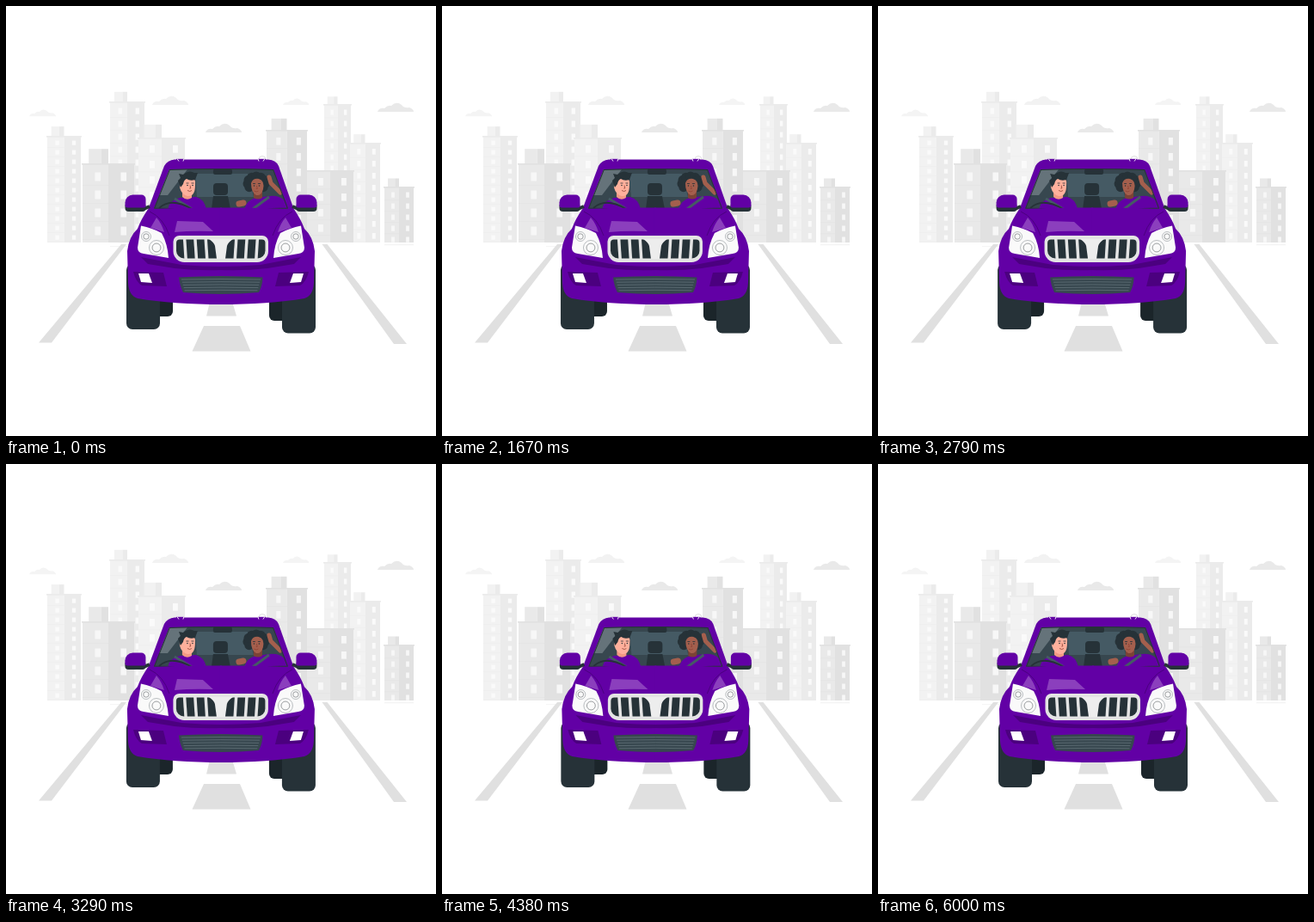
An HTML page with a canvas that plays this animation: 500 px wide and 500 px high, repeating every 6.04 s.

```html
<!DOCTYPE html>
<html lang="en">
<head>
<meta charset="utf-8">
<title>Car ride</title>
<style>
html, body { margin: 0; width: 100%; height: 100%; overflow: hidden; background: #fff; }
canvas { display: block; width: 500px; height: 500px; }
</style>
</head>
<body>
<canvas id="stage"></canvas>
<script>
const canvas = document.getElementById('stage');
const ctx = canvas.getContext('2d');
const ratio = window.devicePixelRatio || 1;
canvas.width = canvas.height = 500 * ratio;

const LOOP = 6040, STEP = 600, REACH = 0.75;
const SWINGS = [0, -1, 2, -4, 4, -4];
const BODY = '#6200a5', SHADE = '#4b007f', GLOSS = '#8b3fbd';
const INK = '#263238', SLATE = '#37474f', STEEL = '#455a64', LIGHT = '#e4e4e4';
const FAR = ['#f2f2f2', '#ebebeb', '#fafafa'];
const NEAR = ['#e9e9e9', '#e1e1e1', '#f7f7f7'];

function fill(color, d) {
  ctx.fillStyle = color;
  ctx.fill(new Path2D(d));
}
function line(color, width, d) {
  ctx.strokeStyle = color;
  ctx.lineWidth = width;
  ctx.stroke(new Path2D(d));
}
function rect(color, x, y, w, h) {
  ctx.fillStyle = color;
  ctx.fillRect(x, y, w, h);
}
function round(color, x, y, w, h, r) {
  ctx.fillStyle = color;
  ctx.beginPath();
  ctx.roundRect(x, y, w, h, r);
  ctx.fill();
}
function disc(color, x, y, r) {
  ctx.fillStyle = color;
  ctx.beginPath();
  ctx.arc(x, y, r, 0, Math.PI * 2);
  ctx.fill();
}
function ring(color, width, x, y, r) {
  ctx.strokeStyle = color;
  ctx.lineWidth = width;
  ctx.beginPath();
  ctx.arc(x, y, r, 0, Math.PI * 2);
  ctx.stroke();
}
// Draws a part and its mirror image about the middle of the stage.
function both(part) {
  part(0);
  ctx.save();
  ctx.translate(500, 0);
  ctx.scale(-1, 1);
  part(1);
  ctx.restore();
}

// Everything on a tower follows from its width, storey height and tone.
function tower(x, y, w, storey, tone, roof = w * 0.28) {
  const [front, side, pane] = tone;
  const half = w / 2, tall = 275 - y;
  rect(front, x + w * 0.12, y - roof, w * 0.24, roof);
  rect(side, x + w * 0.36, y - roof, w * 0.14, roof);
  rect(front, x, y, half, tall);
  rect(side, x + half, y, half, tall);
  for (let wy = y + storey * 0.5; wy < 270; wy += storey) {
    for (const part of [0.24, 0.74]) {
      rect(pane, x + w * part, wy, w * 0.11, storey * 0.48);
    }
    rect(side, x, wy + storey * 0.7, w, 0.5);
  }
  rect(side, x - 1, y, w + 2, 1.6);
}

function cloud(x, y, size, color) {
  ctx.save();
  ctx.translate(x, y);
  ctx.scale(size, size);
  fill(color, 'M0 11Q2 6 8 7Q12 3 16 4Q22-2 28 3Q31 7 37 6Q42 8 42 11Z');
  ctx.restore();
}

function scenery() {
  rect('#fff', 0, 0, 500, 500);
  cloud(27, 120, 0.74, '#f4f4f4');
  cloud(170, 104, 1, '#f2f2f2');
  cloud(232, 136, 1, '#e9e9e9');
  cloud(322, 107, 0.72, '#f4f4f4');
  cloud(432, 112, 1, '#e9e9e9');

  tower(121, 111, 40, 15, FAR);
  tower(154, 153, 54, 18, FAR);
  tower(48, 151, 39, 11, FAR);
  tower(89, 183, 60, 21, NEAR);
  tower(370, 114, 31, 13, FAR);
  tower(400, 159, 35, 14, FAR);
  tower(303, 144, 47, 18, NEAR);
  tower(350, 191, 54, 18, NEAR, 0);
  tower(440, 210, 34, 13, NEAR);

  fill('#e0e0e0', 'M134 277H140L53 391.5H38ZM367.5 277H373.5L466 393H451Z');
  fill('#e0e0e0', 'M238 340H262L268 360.5H233ZM230 372H272L284.5 401.5H216.5Z');
  ring('#dedede', 1, 298, 178.5, 4);
}

function features(x, y) {
  for (const dx of [0, 6]) {
    disc(INK, x + dx, y, 0.8);
    line(INK, 0.8, `M${x + dx - 1.5} ${y - 2.5}h3`);
  }
  line('#8f4033', 0.8, `M${x + 3} ${y}l.8 3.5h-1.5M${x} ${y + 6}q3 2 5 0`);
}

function man() {
  fill(BODY, 'M188 236Q190 226 202 223L221 222Q230 224 233 236Z');
  fill('#f29a84', 'M205 213H216V223Q210 227 205 222Z');
  fill('#ffb09c', 'M202 206Q204 196 212 197Q221 198 220 208Q220 222 211 221Q204 219 202 211Z');
  fill(INK, 'M203 211L200 203L203 200L201 195L206 196Q213 190 219 194L223 194L220 202Q214 204 210 201Q207 202 206 207Z');
  features(211, 208.5);
  line(STEEL, 3, 'M196 224L216 236');
}

function woman() {
  for (let i = 0; i < 9; i++) {
    const a = Math.PI * (0.8 + i * 0.175);
    disc(INK, 291 + 10 * Math.cos(a), 206 + 8 * Math.sin(a), 5.5);
  }
  fill(BODY, 'M277 236Q280 226 290 223L307 221Q317 220 324 226L329 235Z');
  fill('#7c4336', 'M288 214H298V223Q293 226 288 223Z');
  fill('#a45f4d', 'M285 206Q287 200 294 201Q301 203 299 213Q297 221 291 220Q285 217 285 206Z');
  features(288.5, 209);
  ctx.lineCap = 'round';
  line('#a45f4d', 5, 'M306 199L308 206L319 217');
  line('#a45f4d', 7, 'M271 230L276 229');
  ctx.lineCap = 'butt';
  line(STEEL, 3, 'M306 222L287 236');
}

function cabin() {
  fill(BODY, 'M184 186Q188 179 196 178.5H305Q314 179 317 186L336 240H164Z');
  both(() => {
    rect(BODY, 198, 177.8, 9, 3);
    line('#f2eaf7', 1, 'M199 177.5L201 180.5M207 177.5L206 180.5');
  });
  ctx.save();
  ctx.clip(new Path2D('M190 190Q250 188 311 190L328 235.5Q250 238 172 235.5Z'));
  rect(SLATE, 165, 185, 170, 55);
  fill('#65737a', 'M188 190H211L188 220H174Z');
  fill(STEEL, 'M220 195H281L288 222H222Z');
  round(INK, 241, 206, 17, 14, 4);
  fill(INK, 'M239 236L241 221H258L261 236Z');
  man();
  woman();
  line(INK, 2, 'M178 235Q192 222 216 236');
  line(INK, 2, 'M190 190Q250 188 311 190L328 235.5Q250 238 172 235.5Z');
  ctx.restore();
  round(INK, 241, 189.5, 22, 6.5, 2);
}

function wheels() {
  both(right => {
    round('#1b252a', 166, 325, 28, 36 + right * 5, 6);
    round(INK, 140, 300, 39, 76 + right * 4.5, 7);
  });
}

function mirrors() {
  both(() => {
    line(INK, 4, 'M158 237L167 233');
    round(INK, 138.5, 229, 24, 10, 4);
    round(BODY, 138.5, 219.5, 24, 15, [9, 5, 2, 3]);
  });
}

function headlight() {
  fill('#fafafa', 'M157 255.5Q170 258 181 264Q188 277 189 293L160 288Q153 287 153 281Z');
  for (const [x, y, r] of [[163, 268, 5.5], [175, 281, 8.5]]) {
    ring('#a9aeb1', 0.8, x, y, r);
    ring('#75797c', 0.7, x, y, r * 0.58);
  }
}

function grille() {
  round(LIGHT, 194.5, 267, 110.5, 31, [7, 7, 13, 13]);
  round(INK, 198, 271.5, 103.5, 22, [4, 4, 9, 9]);
  both(() => {
    for (let i = 0; i < 3; i++) {
      const x = 231.5 - i * 12.3;
      fill(LIGHT, `M${x - 1} 271H${x + 2.5}L${x + 4} 294H${x + 0.5}Z`);
    }
  });
  fill('#ededed', 'M236 271H264Q258 275 257 279L255 294H245L243 279Q242 275 236 271Z');
}

function bumper() {
  both(() => {
    fill(SHADE, 'M157 292L204 301Q228 303 251 303V307Q222 308 196 305L165 300Z');
    fill(SHADE, 'M148 309L183 310L187 326L158 325Q151 321 148 309Z');
    fill('#fff', 'M154 311H166L170 322L157 321Z');
  });
  fill(SLATE, 'M201 315.5Q250 312.5 298.5 315.5Q298 326 294 333Q250 337 206 333Q202 325 201 315.5Z');
  for (let i = 0; i < 5; i++) {
    const y = 318 + i * 3.2, dx = i * 0.9;
    line('#68777e', 0.7, `M${204 + dx} ${y}Q250 ${y - 1} ${296 - dx} ${y}`);
  }
}

function body() {
  both(() => {
    fill(BODY, 'M251 234.5Q200 234 165 236.5Q157 248 153 259Q143 268 141 285L142 322Q143 337 153 340Q195 347 251 347Z');
    line(SHADE, 1, 'M167 239Q183 246 190 267');
    fill(GLOSS, 'M175 246Q181 253 184 263L168 258Z');
  });
  fill(GLOSS, 'M199 250L229 251L241 262Q216 261 196 263Z');
  both(headlight);
  grille();
  bumper();
}

// The swings grow to the middle of the loop and then run backwards.
function swing(i) {
  return SWINGS[Math.min(i, 10 - i)];
}
function shakeAt(ms) {
  const p = Math.min(ms / STEP, 10);
  const i = Math.min(Math.floor(p), 9);
  return REACH * (swing(i) + (swing(i + 1) - swing(i)) * (p - i));
}

function draw(ms) {
  ctx.setTransform(ratio, 0, 0, ratio, 0, 0);
  scenery();
  ctx.translate(shakeAt(ms), 0);
  wheels();
  cabin();
  body();
  mirrors();
}

const start = performance.now();
function tick() {
  draw((performance.now() - start) % LOOP);
  requestAnimationFrame(tick);
}
tick();
</script>
</body>
</html>
```
